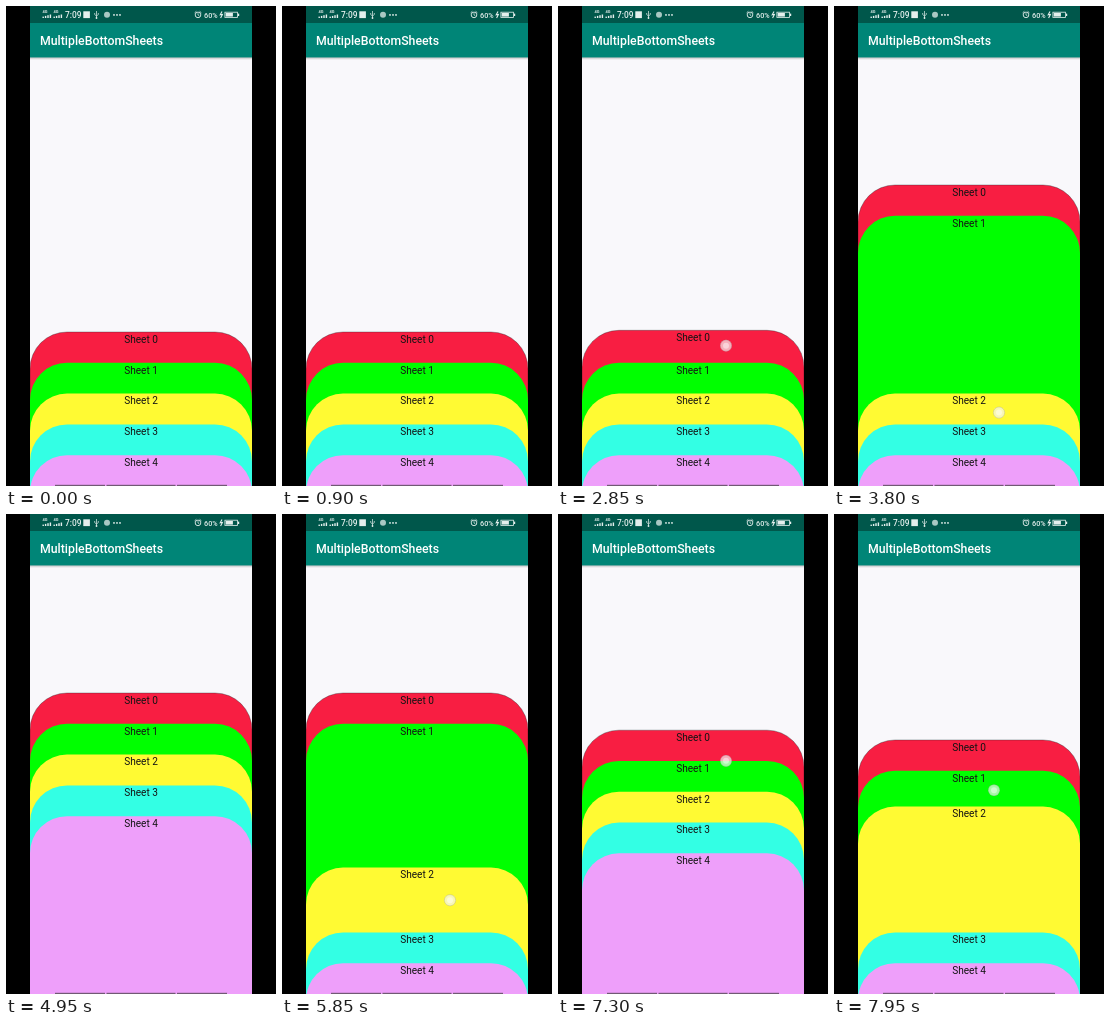
Write an HTML page with a canvas that moves like this. It is 270 px wide and 480 px high and loops after 8000 ms.

```html
<!DOCTYPE html>
<html lang="en">
<head>
<meta charset="utf-8">
<title>MultipleBottomSheets</title>
<style>
  html, body { margin: 0; width: 100%; height: 100%; overflow: hidden; background: #000; }
  canvas { display: block; width: 270px; height: 480px; }
</style>
</head>
<body>
<canvas id="stage"></canvas>
<script>
const W = 270, H = 480, LOOP = 8000;
const LEFT = 24, RIGHT = 246;
const canvas = document.getElementById('stage');
const ctx = canvas.getContext('2d');
const dpr = window.devicePixelRatio || 1;
canvas.width = W * dpr;
canvas.height = H * dpr;

const COLORS = ['#f81e42', '#00ff00', '#fffa33', '#33ffe4', '#ee9ffa'];
const TOP = 326, GAP = 30.8, TRAVEL = 147, RADIUS = 37;
const SWIPE = 192, SWIPE_MS = 300, GRAB = 19;

// Each swipe drags one sheet; dir 1 is up, -1 is down.
const swipe = (start, sheet, dir, x, lag = 14, slack = 0) => ({ start, sheet, dir, x, lag, slack });
const swipes = [
  swipe(60, 4, 1, 186),
  swipe(480, 0, -1, 172),
  swipe(1360, 4, 1, 198),
  swipe(2170, 0, -1, 172),
  swipe(2819, 0, 1, 168),
  swipe(3340, 1, 1, 166),
  swipe(3800, 2, 1, 165),
  swipe(4190, 3, 1, 168),
  swipe(4600, 4, 1, 172),
  swipe(5050, 4, -1, 170),
  swipe(5370, 3, -1, 168),
  swipe(5670, 2, -1, 168),
  swipe(5960, 1, -1, 166),
  swipe(6320, 0, -1, 166),
  swipe(6716, 4, 1, 174, 11),
  swipe(7200, 0, -1, 168),
  swipe(7766, 2, 1, 160, 31, 5)
];

const clamp = v => Math.min(1, Math.max(0, v));
const ease = u => (1 - Math.cos(Math.PI * clamp(u))) / 2;
const dragged = (s, t) => SWIPE * ease((t - s.start) / SWIPE_MS);
const restTop = i => TOP + i * GAP;

// A sheet pushes those above it when raised and those below it when lowered.
function openings(t) {
  const open = COLORS.map(() => 0);
  for (const s of swipes) {
    if (t < s.start) break;
    open.forEach((o, i) => {
      const delay = s.lag + (i === s.sheet ? s.slack : 0);
      const p = clamp(dragged(s, t - delay) / TRAVEL);
      if (s.dir > 0 && i <= s.sheet) open[i] = Math.max(o, p);
      if (s.dir < 0 && i >= s.sheet) open[i] = Math.min(o, 1 - p);
    });
  }
  return open;
}

function rect(x, y, w, h, fill) {
  ctx.fillStyle = fill;
  ctx.fillRect(x, y, w, h);
}

function disc(x, y, r, fill) {
  ctx.beginPath();
  ctx.arc(x, y, r, 0, Math.PI * 2);
  ctx.fillStyle = fill;
  ctx.fill();
}

function label(str, x, y, size, fill, weight = 400, align = 'left') {
  ctx.font = `${weight} ${size}px Roboto, sans-serif`;
  ctx.textAlign = align;
  ctx.fillStyle = fill;
  ctx.fillText(str, x, y);
}

function line(points, color, width) {
  ctx.beginPath();
  points.forEach(([x, y], i) => i ? ctx.lineTo(x, y) : ctx.moveTo(x, y));
  ctx.strokeStyle = color;
  ctx.lineWidth = width;
  ctx.stroke();
}

function sheet(i, y) {
  ctx.beginPath();
  ctx.moveTo(LEFT, H + RADIUS);
  ctx.lineTo(LEFT, y + RADIUS);
  ctx.arcTo(LEFT, y, LEFT + RADIUS, y, RADIUS);
  ctx.lineTo(RIGHT - RADIUS, y);
  ctx.arcTo(RIGHT, y, RIGHT, y + RADIUS, RADIUS);
  ctx.lineTo(RIGHT, H + RADIUS);
  ctx.fillStyle = COLORS[i];
  ctx.fill();
  if (i === 0) {
    ctx.strokeStyle = 'rgba(0,40,40,0.45)';
    ctx.lineWidth = 0.7;
    ctx.stroke();
  }
  label('Sheet ' + i, 135, y + 10.8, 10.1, '#141414', 400, 'center');
}

function signal(x) {
  label('4G', x, 7.3, 4, '#e4efed', 700);
  for (let i = 0; i < 4; i++) rect(x + i * 2.4, 10.6 - i * 0.7, 1.4, 1.4 + i * 0.7, '#e4efed');
}

function statusBar() {
  const ink = '#e4efed';
  rect(LEFT, 0, RIGHT - LEFT, 17, '#00574b');
  signal(36.5);
  signal(47.5);
  label('7:09', 59, 12, 8.4, ink, 500);
  rect(77.3, 5.3, 6.6, 6.8, ink);

  line([[90.5, 5], [90.5, 12]], ink, 0.7);
  line([[88.7, 7], [88.7, 8.6], [90.5, 10], [92.3, 8.6], [92.3, 7]], ink, 0.7);
  disc(90.5, 12, 0.9, ink);

  disc(101, 8.7, 3, '#a9c8c3');
  for (let i = 0; i < 3; i++) disc(108 + i * 3, 8.9, 0.9, ink);

  ctx.beginPath();
  ctx.arc(192, 8.9, 2.8, 0, Math.PI * 2);
  ctx.strokeStyle = ink;
  ctx.lineWidth = 0.9;
  ctx.stroke();
  line([[192, 7.2], [192, 9], [193.3, 9.8]], ink, 0.7);
  line([[188.6, 6.8], [190.4, 5.3]], ink, 0.8);
  line([[193.6, 5.3], [195.4, 6.8]], ink, 0.8);

  label('60%', 198, 11.6, 7.3, ink, 500);
  line([[216, 5.4], [214.2, 8.8], [216.4, 8.5], [214.6, 12]], ink, 1.1);
  ctx.strokeStyle = ink;
  ctx.lineWidth = 0.8;
  ctx.strokeRect(218.9, 6.2, 12.6, 5.2);
  rect(219.7, 7, 7.2, 3.6, ink);
  rect(232, 7.6, 1.2, 2.4, ink);
}

function toolbar() {
  rect(LEFT, 17, RIGHT - LEFT, 34.5, '#008577');
  const shade = ctx.createLinearGradient(0, 51.5, 0, 54);
  shade.addColorStop(0, 'rgba(0,0,0,0.22)');
  shade.addColorStop(1, 'rgba(0,0,0,0)');
  rect(LEFT, 51.5, RIGHT - LEFT, 2.5, shade);
  label('MultipleBottomSheets', 34, 39.2, 12.3, '#fff', 500);
}

function navBar() {
  const ink = 'rgba(60,60,60,0.7)';
  rect(49, 478.8, 50, 1.2, ink);
  rect(100.5, 478.8, 69, 1.2, ink);
  rect(171, 478.8, 50, 1.2, ink);
}

function finger(t) {
  const s = swipes.find(m => t >= m.start - 30 && t <= m.start + SWIPE_MS + 25);
  if (!s) return;
  const from = restTop(s.sheet) - (s.dir < 0 ? TRAVEL : 0) + GRAB;
  const y = from - s.dir * dragged(s, t);
  disc(s.x, y, 5.8, 'rgba(245,245,245,0.68)');
  disc(s.x, y, 3, 'rgba(255,255,255,0.45)');
  ctx.beginPath();
  ctx.arc(s.x, y, 5.6, 0, Math.PI * 2);
  ctx.strokeStyle = 'rgba(110,110,110,0.35)';
  ctx.lineWidth = 0.6;
  ctx.stroke();
}

function draw(t) {
  ctx.setTransform(dpr, 0, 0, dpr, 0, 0);
  rect(0, 0, W, H, '#000');
  rect(LEFT, 0, RIGHT - LEFT, H, '#f9f8fb');
  statusBar();
  toolbar();
  ctx.save();
  ctx.beginPath();
  ctx.rect(LEFT, 0, RIGHT - LEFT, H);
  ctx.clip();
  openings(t).forEach((o, i) => sheet(i, restTop(i) - o * TRAVEL));
  navBar();
  finger(t);
  ctx.restore();
}

const begun = performance.now();
function tick() {
  draw((performance.now() - begun) % LOOP);
  requestAnimationFrame(tick);
}
tick();
</script>
</body>
</html>
```
